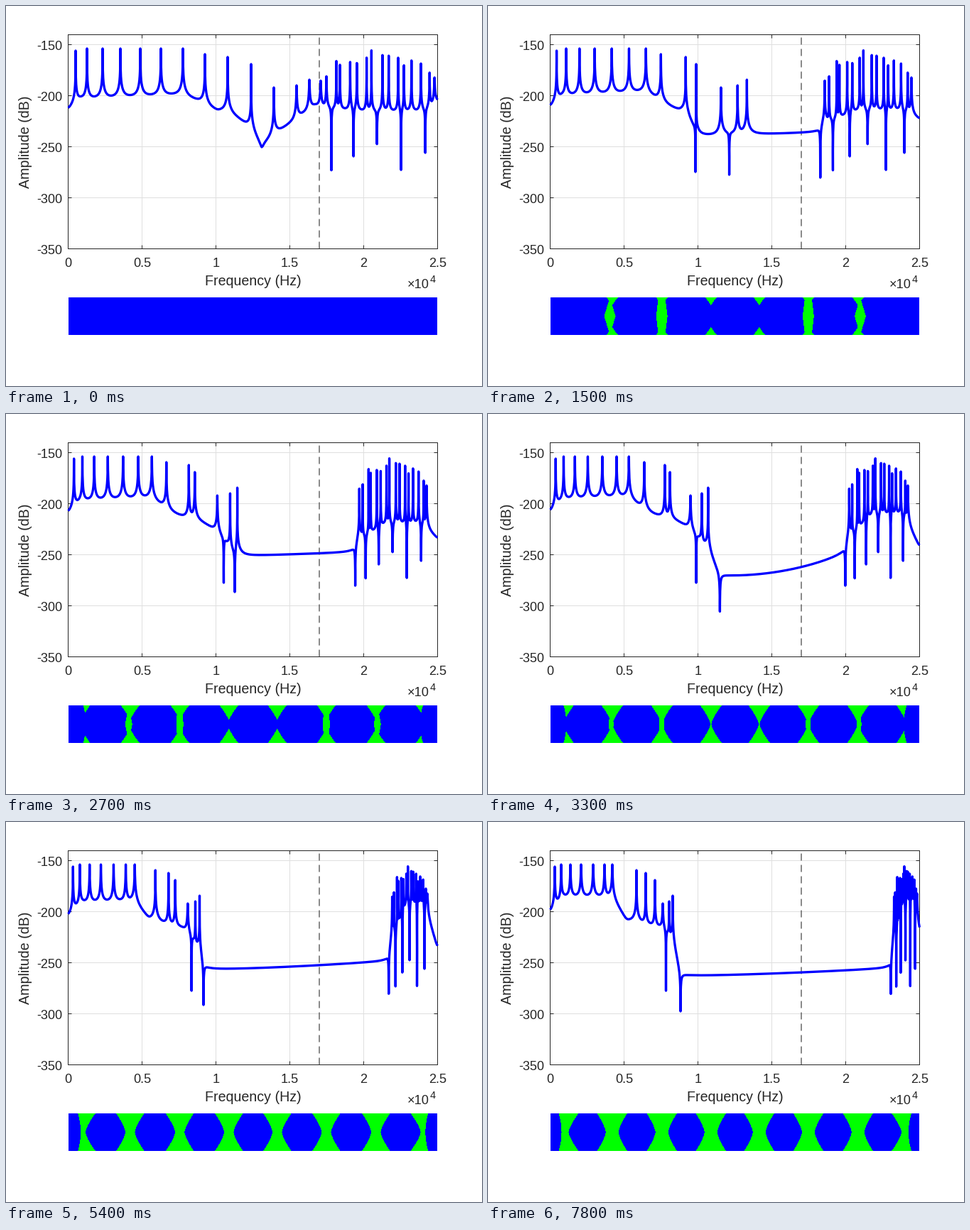
Animation of 670 by 536 pixels, one loop 8 s. Source, as a matplotlib script:

```python
import numpy as np
import matplotlib.pyplot as plt
from matplotlib.animation import FuncAnimation

W, H, DPI = 670, 536, 100
LEFT, RIGHT, TOP, BOTTOM = 87.5, 607.5, 40.5, 342.5
INK, GRID = "#262626", "#dfdfdf"
CAP = 60            # highest level a resonance reaches
LOG = 14.4          # pixels per decade of power
STEPS = 26
MID = 347.75
GRID_X = np.arange(LEFT, RIGHT + 0.1, 0.25)

# Low resonances glide from START to END, each at its own pace.
START = np.array([98, 114, 136, 161, 189, 218, 249, 280, 312, 345, 377, 409, 427])
END = np.array([94, 103, 116, 131, 148, 164, 175, 209, 222, 235, 246, 255, 260])
PACE = np.array([2.1] * 7 + [3.4, 2.2, 3] + [2.2] * 3)
TOPS = [63] + [60] * 6 + [68, 72, 82, 115, 112, 104]

# Stop band: step, edge x, edge y, far y, bend of its floor; then the level
# of the upper pass band and the level at the right end.
GAP = np.array([
    (0, 360, 199, 142, 0.9, 150, 136),
    (5, 292, 184, 178, 1.2, 148, 160),
    (9, 322, 201, 195, 1.0, 155, 176),
    (14, 333, 270, 199, 4.0, 122, 205),
    (18, 278, 208, 196, 1.5, 115, 178),
    (22, 271, 215, 205, 1.5, 112, 160),
    (26, 271, 217, 206, 1.5, 110, 158)])

# Upper resonances: an uneven comb squeezed between the band's two ends.
rng = np.random.default_rng(4)
COMB = (np.arange(16) + rng.uniform(-0.3, 0.3, 16)) / 15
COMB_TOPS = CAP + 30 * (2 * COMB - 1) ** 2 + rng.uniform(0, 18, 16)
COMB_LOWS = rng.uniform(180, 235, 5)


def lerp(a, b, t):
    return a + (b - a) * t


def smooth(y):
    box = np.ones(17) / 17
    for _ in range(2):
        y = np.convolve(np.pad(y, 8, mode="edge"), box, mode="valid")
    return y


def resonance(x, centre, width, height):
    eps = width * 10 ** (-height / (2 * LOG))
    return width ** 2 / ((x - centre) ** 2 + eps ** 2)


def spectrum(step):
    s = step / STEPS
    edge_x, edge_y, far_y, bend, band_y, end_y = (
        np.interp(step, GAP[:, 0], column) for column in GAP.T[1:])
    modes = lerp(END, START, (1 - s) ** PACE)
    band_lo = lerp(571, 440, (1 - s) ** 1.3)
    band_hi = 604 - 13 * np.sin(np.pi * s)
    span = band_hi - band_lo
    far_x = band_lo - 5
    shoulder = lerp(240, 298, (1 - s) ** 3)

    # Floor: lower pass band, fall to the gap, gap, upper pass band.
    points = np.array([
        (LEFT, lerp(147, 128, s)), (105, lerp(133, 107, s)),
        (modes[6], lerp(126, 107, s)), (modes[6] + 20, lerp(135, 140, s)),
        (shoulder, 150), (edge_x, edge_y), (far_x, far_y),
        (band_lo + 0.1 * span, (far_y + band_y) / 2),
        (band_lo + 0.4 * span, band_y), (band_hi - 0.1 * span, band_y),
        (RIGHT, end_y)])
    floor = np.interp(GRID_X, points[:, 0], points[:, 1])
    fall = np.clip((GRID_X - shoulder) / (edge_x - shoulder), 0, 1)
    gap = np.clip((GRID_X - edge_x) / (far_x - edge_x), 0, 1)
    floor = np.where((fall > 0) & (fall < 1), lerp(150, edge_y, fall ** 2), floor)
    floor = np.where((gap > 0) & (gap < 1), lerp(edge_y, far_y, gap ** bend), floor)
    floor = smooth(floor)

    comb = band_lo + span * COMB
    peaks = sorted(zip([*modes, *comb], [*TOPS, *COMB_TOPS]))
    opening = min(1, step / 5)
    dips = [(edge_x, edge_y + 50 * opening, 2.5),
            (band_lo - 4, lerp(far_y, 242, opening), 1.8),
            ((modes[10] + modes[11]) / 2, lerp(160, 238, opening), 1.2)]
    dips += zip((comb[1::3] + comb[2::3]) / 2, COMB_LOWS, [1.5] * 5)

    centres = np.array([p[0] for p in peaks])
    x = np.unique(np.concatenate([GRID_X, centres, [d[0] for d in dips]]))
    base = np.interp(x, GRID_X, floor)
    spacing = np.convolve(np.diff([75, *centres, 620]), [0.5, 0.5], mode="valid")

    lift = np.zeros_like(x)
    for (centre, top), room in zip(peaks, spacing):
        height = max(np.interp(centre, x, base) - top, 0)
        width = max(min(0.35 * room, height / 8, 10), 0.1)
        lift += resonance(x, centre, width, height)
    y = base - LOG * np.log10(1 + lift)
    for centre, low, width in dips:
        depth = max(low - np.interp(centre, x, base), 0)
        if depth > 1:
            y += LOG * np.log10(1 + resonance(x, centre, width, depth))
            i = np.searchsorted(x, centre)
            y[i] = max(y[i], low)
    for centre, top in peaks:
        i = np.searchsorted(x, centre)
        y[i] = min(y[i], top)
    return x, np.clip(y, CAP, BOTTOM - 2)


COLS, ROWS = 520, 53
cell_x = LEFT + np.arange(COLS) + 0.5
fold_x = MID - np.abs(cell_x - MID)
u = np.abs((np.arange(ROWS) + 0.5) * 2 / ROWS - 1)[:, None]


def layout(step):
    """Green bands that start at the rims, meet in the middle and widen."""
    s = step / STEPS
    left = 1 - s
    flare = u ** 1.4
    neck, rim = 9 - 25 * left ** 2, 21.3 * (1 - left ** 2.3)
    half = lerp(neck, rim, flare)
    core = max(0, 11.6 - 18.8 * s) * min(1, step / 5)

    def near(centre, width):
        return np.abs(fold_x - centre) < width

    late = 24 * left ** 2.3
    green = near(MID - 34.5, half)
    green |= near(MID - 103.6, np.maximum(half, core * (1 - 0.4 * u)))
    green |= near(MID - 173.5, half)
    green |= near(MID - 173.5 - 0.4 * core, core * (1 - u))
    green |= ((fold_x > 103 - 4 * u ** 2 + late)
              & (fold_x < 113 + 14 * flare - late))
    if step == 0:
        green[:] = False
    return np.where(green[..., None], (0.0, 1.0, 0.0), (0.0, 0.0, 1.0))


def px(size):
    return size * 72 / DPI


fig = plt.figure(figsize=(W / DPI, H / DPI), dpi=DPI, facecolor="white")
ax = fig.add_axes([0, 0, 1, 1])
ax.axis("off")
bar = ax.imshow(layout(0), extent=(88, 607, 464.5, 411.5),
                interpolation="nearest", aspect="auto")
ax.set_xlim(0, W)
ax.set_ylim(H, 0)


def rule(xs, ys, color=INK, zorder=2):
    ax.plot(xs, ys, color=color, lw=px(1), zorder=zorder, snap=False,
            solid_capstyle="butt", solid_joinstyle="miter")


def label(x, y, text, size=18.1, **kw):
    kw = {"ha": "center", "va": "baseline", **kw}
    ax.text(x, y, text, family="Liberation Sans", fontsize=px(size), color=INK, **kw)


for i in range(6):
    x = LEFT + i * 104
    if 0 < i < 5:
        rule([x, x], [TOP, BOTTOM], GRID, zorder=1)
    rule([x, x], [BOTTOM, BOTTOM - 5])
    rule([x, x], [TOP, TOP + 5])
    label(x, 368, f"{i / 2:g}")
for db in range(-350, -149, 50):
    y = np.floor(TOP + (-140 - db) * (BOTTOM - TOP) / 210) + 0.5
    if db > -350:
        rule([LEFT, RIGHT], [y, y], GRID, zorder=1)
    rule([LEFT, LEFT + 5], [y, y])
    rule([RIGHT, RIGHT - 5], [y, y])
    label(79.5, y + 7, str(db), ha="right")
rule([LEFT, RIGHT, RIGHT, LEFT, LEFT], [TOP, TOP, BOTTOM, BOTTOM, TOP])
ax.plot([441, 441], [BOTTOM, TOP], color="#404040", lw=px(1.2), zorder=2.5,
        dashes=(10 / 1.2, 6 / 1.2), dash_capstyle="butt", snap=False)

label(347.5, 394.5, "Frequency (Hz)", 19.7)
label(37, 192, "Amplitude (dB)", 19.7, rotation=90, ha="right", va="center")
label(565, 397.5, "×10", ha="left")
label(597, 389.5, "4", 14.5, ha="left")

curve, = ax.plot([], [], color="blue", lw=px(3.3), zorder=3,
                 solid_joinstyle="round", solid_capstyle="butt")


def draw(frame):
    step = frame // 3
    curve.set_data(*spectrum(step))
    bar.set_data(layout(step))
    return curve, bar


anim = FuncAnimation(fig, draw, frames=80, interval=100, repeat=True,
                     repeat_delay=0, blit=False)
plt.show()
```
